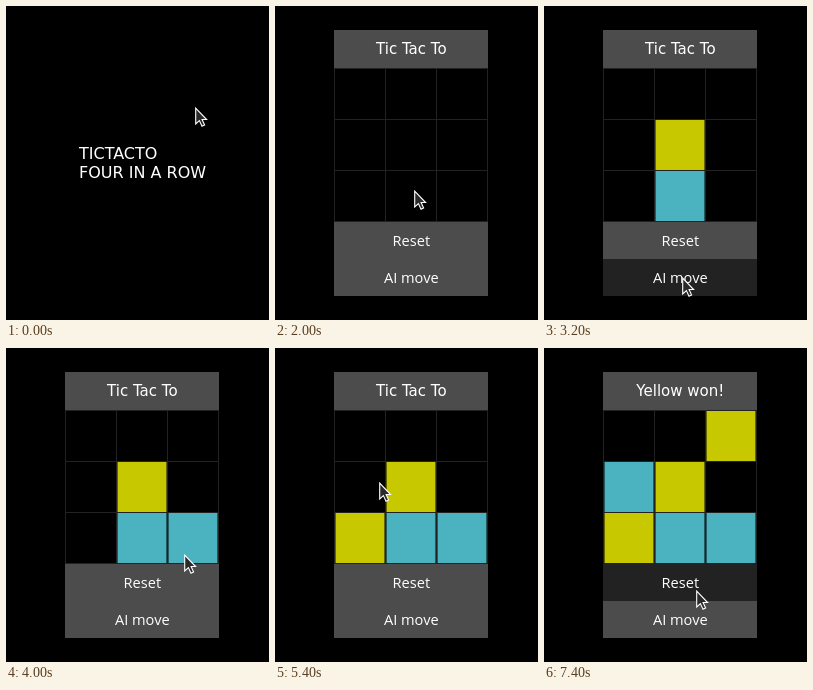
Animation, 263 px wide and 314 px high, one loop 7.8 s. Source, as an HTML page:

```html
<!DOCTYPE html>
<html lang="en">
<head>
<meta charset="utf-8">
<title>Tic Tac To</title>
<style>
  html, body { margin: 0; width: 100%; height: 100%; overflow: hidden; background: #000; }
  svg { display: block; }
  text { fill: #fff; font: 15px "DejaVu Sans", sans-serif; }
  .menu text { font-size: 16px; }
  .bar { fill: #4c4c4c; }
  .bar.hover, .line { fill: #222; }
  .mid { text-anchor: middle; }
  .button { font: 500 14.6px "Open Sans", sans-serif; }
</style>
</head>
<body>
<svg id="stage" width="263" height="314" viewBox="0 0 263 314"></svg>
<script>
const LOOP = 7800, STEP = 200, OPEN = 1200, FIT = 1400, WIN = 6400;
const CELL = 51, LEFT = 59, TOP = 62, SIZE = 154;
const CYAN = '#4ab3bf', YELLOW = '#c8c800';

// Pointer trips: leave, arrive, where to, and when a cell is claimed there.
const home = { x: 189, y: 101 };
const trips = [
  { leave: 0, arrive: 1200, x: 126, y: 138 },
  { leave: 1200, arrive: 2000, x: 139, y: 184, claim: 2400 },
  { leave: 2200, arrive: 3200, x: 138, y: 271, reply: 1 },
  { leave: 3200, arrive: 4000, x: 178, y: 206, claim: 4000 },
  { leave: 4000, arrive: 4600, x: 146, y: 268, reply: 0 },
  { leave: 4600, arrive: 5400, x: 104, y: 134, claim: 5600 },
  { leave: 5400, arrive: 6400, x: 145, y: 269, reply: 2 },
  { leave: 6600, arrive: 7000, x: 153, y: 242 },
  { leave: 7200, arrive: 7400, x: 152, y: 242 }
];

const stage = document.getElementById('stage');

function add(parent, tag, attrs, label) {
  const el = document.createElementNS('http://www.w3.org/2000/svg', tag);
  for (const key in attrs) el.setAttribute(key, attrs[key]);
  if (label) el.textContent = label;
  parent.appendChild(el);
  return el;
}

function addBar(y, height, label, base, extra) {
  const rect = add(game, 'rect', { class: 'bar', y, height });
  const text = add(game, 'text', { class: 'mid ' + extra, x: 136.3, y: base }, label);
  return { rect, text, y, height, base };
}

function addTile(at, col, row, fill) {
  const x = LEFT + 1.5 + col * CELL, y = TOP + 1 + row * CELL;
  return { at, el: add(board, 'rect', { x, y, width: 49, height: 50, fill }) };
}

const menu = add(stage, 'g', { class: 'menu' });
['TICTACTO', 'FOUR IN A ROW'].forEach((label, i) =>
  add(menu, 'text', { x: 73, y: 153 + i * 19 }, label));

const game = add(stage, 'g', {});
const title = addBar(24, 38, 'Tic Tac To', 48, '');
const reset = addBar(216, 37, 'Reset', 240, 'button');
const ai = addBar(253, 37, 'AI move', 277, 'button');

const board = add(game, 'g', {});
for (let i = 0; i < 4; i++) {
  const x = LEFT + i * CELL, y = TOP + i * CELL;
  add(board, 'rect', { class: 'line', x, y: TOP, width: 1, height: SIZE });
  add(board, 'rect', { class: 'line', x: LEFT, y, width: SIZE, height: 1 });
}

// Cyan takes the cell under the pointer, yellow replies along the diagonal.
const tiles = [];
for (const { x, y, arrive, claim, reply } of trips) {
  const index = (value, edge) => Math.floor((value - edge) / CELL);
  if (claim) tiles.push(addTile(claim, index(x, LEFT), index(y, TOP), CYAN));
  if (reply !== undefined) tiles.push(addTile(arrive, reply, 2 - reply, YELLOW));
}

const pointer = add(stage, 'path', {
  d: 'M.7 1.2V17L4.4 13.6L7 19.3L9.6 18.1L7.1 12.5H11.6Z',
  fill: '#2a2a2a', stroke: '#fff', 'stroke-width': 1.1
});

const show = (el, on) => el.setAttribute('visibility', on ? 'visible' : 'hidden');

function pointerAt(t) {
  let { x, y } = home;
  for (const trip of trips) {
    const p = Math.min(1, Math.max(0, (t - trip.leave) / (trip.arrive - trip.leave)));
    const ease = p * p * (3 - 2 * p);
    x += (trip.x - x) * ease;
    y += (trip.y - y) * ease;
  }
  return { x: Math.round(x), y: Math.round(y) };
}

function place(bar, shift, wide) {
  bar.rect.setAttribute('x', wide ? 0 : LEFT);
  bar.rect.setAttribute('width', wide ? 263 : SIZE);
  bar.rect.setAttribute('y', bar.y + shift);
  bar.text.setAttribute('y', bar.base + shift);
}

function draw(time) {
  const t = Math.floor(time / STEP) * STEP;
  const { x, y } = pointerAt(t);
  const wide = t < FIT;
  const open = t >= OPEN;
  menu.style.display = open ? 'none' : '';
  game.style.display = open ? '' : 'none';
  place(title, wide ? 2 : 0, wide);
  for (const bar of [reset, ai]) {
    place(bar, wide ? -2 : 0, wide);
    bar.rect.classList.toggle('hover', y >= bar.y && y < bar.y + bar.height);
  }
  title.text.textContent = t >= WIN ? 'Yellow won!' : 'Tic Tac To';
  show(board, !wide);
  for (const tile of tiles) show(tile.el, !wide && t >= tile.at);
  pointer.setAttribute('transform', `translate(${x} ${y})`);
}

const start = performance.now();
function tick() {
  draw((performance.now() - start) % LOOP);
  requestAnimationFrame(tick);
}
tick();
</script>
</body>
</html>
```
